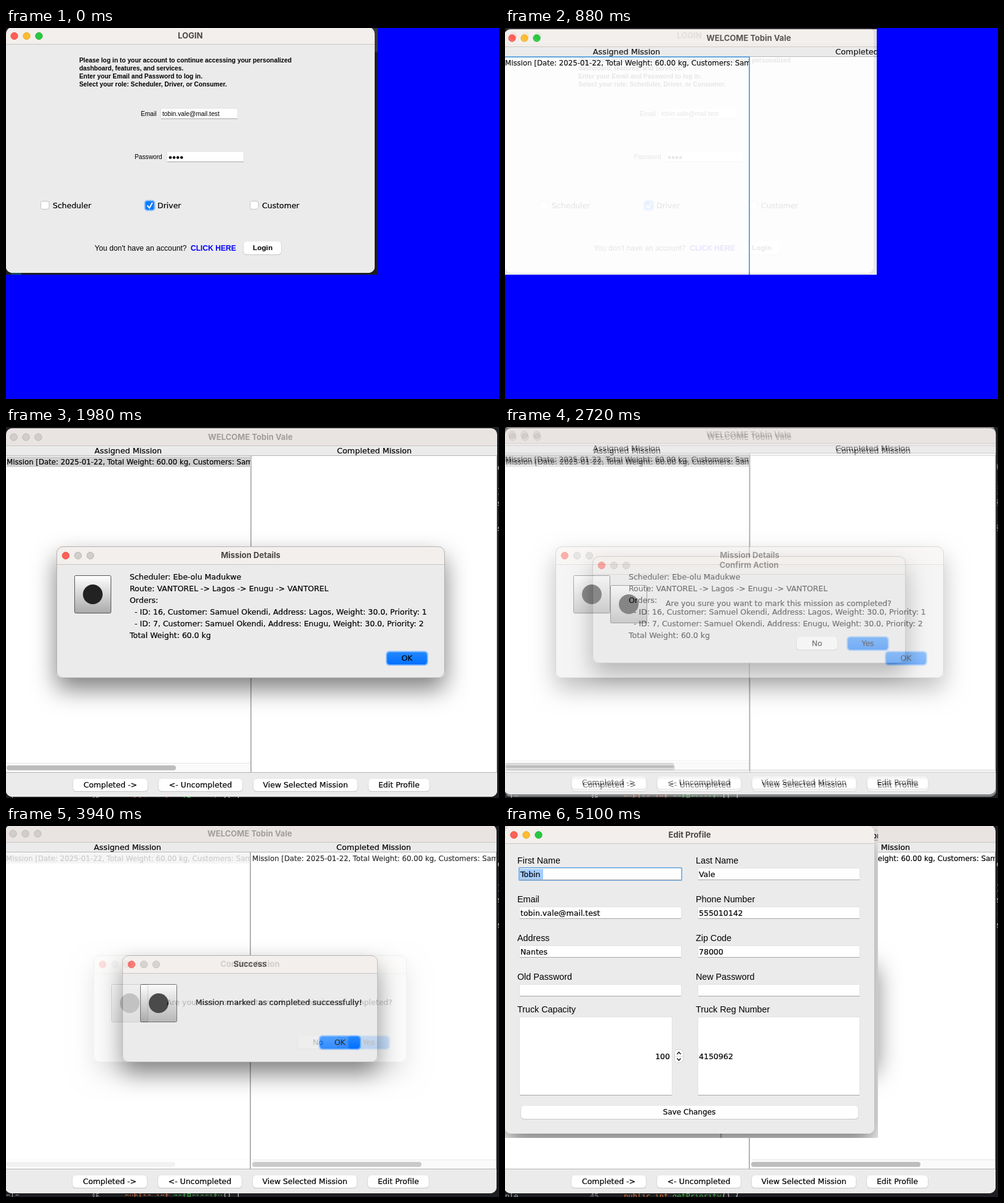
These frames come from a looping animation (801x603 px, 5500 ms). An HTML page:

```html
<!DOCTYPE html>
<html lang="en">
<head>
<meta charset="utf-8">
<title>Mission desk</title>
<style>
html, body { margin: 0; width: 100%; height: 100%; overflow: hidden; background: #00f; }
body > svg { position: absolute; left: 0; top: 0; }
text { font: 12.5px "DejaVu Sans", sans-serif; white-space: pre; }
text:not([class]) { stroke: #000; stroke-width: .2px; }
.arial { font-family: "Liberation Sans", Arial, sans-serif; }
.bold { font-weight: bold; }
.title { font: bold 13px Inter, sans-serif; }
.code { font: 12px "DejaVu Sans Mono", monospace; }
.shadow { filter: drop-shadow(0 18px 19px rgba(0, 0, 0, .5)); }
</style>
</head>
<body>
<script>
const W = 801, H = 603;
const PERSON = ['Tobin', 'Vale'], MAIL = 'tobin.vale@mail.test';
const SCHOOL = 'VANTOREL', CLIENT = 'Samuel Okendi';
const MISSION = `Mission [Date: 2025-01-22, Total Weight: 60.00 kg, Customers: ${CLIENT}]`;
const ACTIVE = '#f3efec', IDLE = '#e9e4e2', BODY = '#ebebeb';

const esc = s => s.replace(/&/g, '&amp;').replace(/</g, '&lt;').replace(/>/g, '&gt;');
const rect = (x, y, w, h, fill, more = '') =>
  `<rect x="${x}" y="${y}" width="${w}" height="${h}" fill="${fill}" ${more}/>`;
const dot = (x, y, r, fill, more = '') =>
  `<circle cx="${x}" cy="${y}" r="${r}" fill="${fill}" ${more}/>`;
const text = (x, y, s, size = 12.5, more = '') =>
  `<text x="${x}" y="${y}" style="font-size:${size}px" ${more}>${esc(s)}</text>`;
const middle = (x, y, s, size, more = '') => text(x, y, s, size, 'text-anchor="middle" ' + more);
const arial = (x, y, s, size, more = '') => text(x, y, s, size, 'class="arial" ' + more);
const bold = (x, y, s, size, fill = '#000') => text(x, y, s, size, `class="arial bold" fill="${fill}"`);

const clip = (x, y, w, h, inner) =>
  `<svg x="${x}" y="${y}" width="${w}" height="${h}" viewBox="${x} ${y} ${w} ${h}">${inner}</svg>`;

// Window frame: title bar of height bar, body below, traffic lights from lightX of which lit are coloured
function frame(x, y, w, h, bar, title, lightX, lit = 3, on = true, cx = x + w / 2) {
  const mid = y + bar / 2 + .5, body = h - bar - 10;
  const colors = ['#ff5f57', '#febc2e', '#28c840'], edges = ['#e2463f', '#e0a020', '#1aab29'];
  let s = rect(x, y, w, h, on ? ACTIVE : IDLE, 'rx="10"') +
    `<path d="M${x} ${y + bar}h${w}v${body}a10 10 0 0 1-10 10h${20 - w}a10 10 0 0 1-10-10z" fill="${BODY}"/>` +
    rect(x, y + bar, w, 1, '#c9c6c4');
  for (let i = 0; i < 3; i++) {
    s += dot(lightX + i * 20, mid, 5.7, i < lit ? colors[i] : '#d1cdcb',
      `stroke="${i < lit ? edges[i] : '#b3b0ae'}" stroke-width=".8"`);
  }
  return s + middle(cx, mid + 4, title, 13, `class="title" fill="${on ? '#494745' : '#a09d9b'}"`);
}

function button(x, y, w, label, h = 21) {
  return rect(x - .5, y, w + 1, h + 1, '#c6c6c6', 'rx="5.5"') + rect(x, y, w, h, '#fff', 'rx="5"') +
    middle(x + w / 2, y + Math.round(h / 2) + 4, label);
}
const blueButton = (x, y, w, label) => rect(x - 1, y - 1, w + 2, 24, '#86bcff', 'rx="6"') +
  rect(x + 1, y + 1, w - 2, 20, 'url(#blue)', 'rx="4.5"') + middle(x + w / 2, y + 15, label);

const field = (x, y, w, h) => rect(x - .5, y - .5, w + 1, h + 1, '#dadada') + rect(x, y, w, h, '#fff') + rect(x, y + h, w, 1, '#a6a6a6');

function checkbox(x, label, on) {
  const box = on
    ? rect(x - 1.5, 279.5, 18, 18, '#8fc0fb', 'rx="5"') + rect(x + .5, 281.5, 14, 14, '#0c7bff', 'rx="3"') +
      `<path d="M${x + 4} 289l3 3.5 4.5-8" fill="none" stroke="#fff" stroke-width="2" stroke-linecap="round"/>`
    : rect(x + .5, 281.5, 13.5, 13, '#fff', 'rx="3" stroke="#c2c2c2"');
  return box + text(x + 20, 293, label);
}

function login() {
  const lines = ['Please log in to your account to continue accessing your personalized',
    'dashboard, features, and services.', 'Enter your Email and Password to log in.',
    'Select your role: Scheduler, Driver, or Consumer.'];
  return rect(0, 0, 604, 401, '#1e1f22') + rect(590, 0, 14, 39, '#393a3d') + rect(8, 398, 17, 3, '#174d5c') +
    frame(0, -1, 599, 399, 27, 'LOGIN', 13.5) +
    lines.map((s, i) => bold(119, 56 + 13 * i, s, 10.3)).join('') +
    arial(219, 143, 'Email', 10.2) + field(252, 131, 124, 16) + arial(254, 143, MAIL, 10.3) +
    arial(209, 213, 'Password', 10.2) + field(262, 201, 124, 16) +
    [0, 1, 2, 3].map(i => dot(267 + 6.1 * i, 210.5, 2.3, '#000')).join('') +
    checkbox(56, 'Scheduler') + checkbox(226, 'Driver', true) + checkbox(396, 'Customer') +
    arial(144, 362, "You don't have an account?", 12.2) + bold(300, 362, 'CLICK HERE', 12.1, '#00f') +
    button(386, 347, 61, '') + bold(401, 361, 'Login', 11.8);
}

// Code editor peeking out behind the window
function editor(dy) {
  const y = 610 + dy;
  const code = (x, y, s, fill) => text(x, y, s, 12, `class="code" fill="${fill}"`);
  return rect(0, 0, W, H, '#1e1f22') +
    code(0, y, 'ple', '#9a9ca0') + code(138, y, '45', '#8a8c90') + code(193, y, 'public int', '#e0703a') +
    code(272, y, 'getPriority', '#3fa845') + code(352, y, '() {', '#ccc') +
    ['c', ')', 's', ':', 's'].map((c, i) => code(798, [70, 109, 128, 151, 169][i] + dy, c, '#ccc')).join('');
}

function desk(dx, dy, { on = false, selected = false, done = false } = {}) {
  const x = done ? 400 : 0;
  const row = (selected ? rect(0, 48, 397, 17, '#d0d0d0') : '') +
    clip(x, 47, 396, 18, text(x, 61, MISSION, 11.77));
  const bar = rect(x, 546, 396, 15, '#fafafa') + rect(x, 546, 396, 1, '#e6e6e6') +
    rect(x, 550, 275, 8, '#bdbdbd', 'rx="4"');
  return editor(dy) + `<g transform="translate(${dx} ${dy})">` +
    frame(-1, 2, 798, 599, 28, 'WELCOME ' + PERSON.join(' '), 11.5, on ? 3 : 0, on, 396) +
    middle(197.5, 43, 'Assigned Mission', 12.8) + middle(597.5, 43, 'Completed Mission', 12.8) +
    rect(-1, 46, 798, 516, '#b4b4b4') + rect(-1, 47, 397, 514, '#fff') + rect(398, 47, 398, 514, '#fff') +
    row + bar +
    (on ? rect(-1, 47, 398, 514.5, 'none', 'stroke="#559fdf" stroke-width="2"') : '') +
    button(108, 572, 121, 'Completed ->', 20) + button(247, 572, 136, '<- Uncompleted', 20) +
    button(401, 572, 169, 'View Selected Mission', 20) + button(588, 572, 99, 'Edit Profile', 20) + '</g>';
}

const dialog = (x, y, w, h, title) =>
  `<g class="shadow">${rect(x, y, w, h, BODY, 'rx="10"')}</g>` +
  frame(x, y, w, h, 29, title, x + 15, 1) +
  rect(x + .5, y + .5, w - 1, h - 1, 'none', 'rx="10" stroke="#b4b2b1"');

const icon = (x, y) => rect(x + .5, y + .5, 59, 61, 'url(#tile)', 'rx="2" stroke="#555"') + dot(x + 30, y + 31, 16, '#222');

function details() {
  const order = (id, city, n) => `- ID: ${id}, Customer: ${CLIENT}, Address: ${city}, Weight: 30.0, Priority: ${n}`;
  const lines = ['Scheduler: Ebe-olu Madukwe', `Route: ${SCHOOL} -> Lagos -> Enugu -> ${SCHOOL}`, 'Orders:',
    order(16, 'Lagos', 1), order(7, 'Enugu', 2), 'Total Weight: 60.0 kg'];
  return desk(1, 0, { selected: true }) + dialog(82, 194, 631, 214, 'Mission Details') + icon(111, 241) +
    lines.map((s, i) => text(s[0] === '-' ? 209 : 201, 248 + 19 * i, s)).join('') +
    blueButton(618, 365, 67, 'OK');
}

const confirmBox = () => desk(0, -4, { selected: true }) + dialog(142, 210, 509, 174, 'Confirm Action') +
  icon(171, 257) + text(261, 291, 'Are you sure you want to mark this mission as completed?') +
  button(474, 341, 66, 'No') + blueButton(556, 341, 67, 'Yes');

const success = () => desk(0, -4, { done: true }) + dialog(189, 210, 415, 174, 'Success') +
  icon(218, 257) + text(308, 291, 'Mission marked as completed successfully!') +
  blueButton(509, 341, 67, 'OK');

function profile() {
  const rows = [['First Name', PERSON[0], 'Last Name', PERSON[1]], ['Email', MAIL, 'Phone Number', '555010142'],
    ['Address', 'Nantes', 'Zip Code', '78000'], ['Old Password', '', 'New Password', '']];
  let s = desk(-46, -23) + `<g class="shadow">${rect(0, 0, 600, 500, BODY, 'rx="10"')}</g>` +
    frame(0, 0, 600, 500, 28, 'Edit Profile', 14.5) +
    rect(22, 67, 266, 22, '#68a9e6', 'rx="2"');
  rows.forEach(([a, b, c, d], i) => {
    const y = 61 + 63 * i;
    s += arial(20, y, a, 14.3) + arial(310, y, c, 14.3) + field(24, y + 8, 262, 18) + field(314, y + 8, 262, 18) +
      (i ? '' : rect(24, 70, 38, 17, '#a5cdff')) + text(25, y + 22, b) + text(315, y + 22, d);
  });
  return s + arial(20, 303, 'Truck Capacity', 14.3) + arial(310, 303, 'Truck Reg Number', 14.3) +
    field(24, 311, 247, 126) + field(314, 311, 262, 126) +
    text(268, 379, '100', 12.5, 'text-anchor="end"') + text(315, 379, '4150962') +
    rect(275.5, 363.5, 14, 21, '#fff', 'rx="5" stroke="#cfcfcf"') + rect(276, 374, 13, 1, '#ddd') +
    '<path d="M279.5 371l3-3.5 3 3.5M279.5 377.5l3 3.5 3-3.5" fill="none" stroke="#222" stroke-width="1.5"/>' +
    button(26, 455, 548, '') + middle(299.5, 469, 'Save Changes', 12);
}

// Width, height and content of each screen
const scenes = [
  [604, 401, login()], [797, 603, desk(0, 0, { on: true })], [801, 603, details()],
  [801, 601, confirmBox()], [801, 603, success()], [606, 507, profile()]
];
const gradient = (id, top, bottom) => `<linearGradient id="${id}" x2="0" y2="1">` +
  `<stop stop-color="${top}"/><stop offset="1" stop-color="${bottom}"/></linearGradient>`;
const defs = `<defs>${gradient('tile', '#fff', '#aaa')}${gradient('blue', '#2488ff', '#0070ff')}</defs>`;
document.body.innerHTML = scenes.map(([, , s], i) =>
  `<svg width="${W}" height="${H}">${i ? '' : defs}${s}</svg>`).join('');
const layers = [...document.querySelectorAll('body > svg')];

const crop = (el, w, h) => el.style.clipPath = `inset(0 ${W - w}px ${H - h}px 0)`;
crop(layers[0], 604, 401);

// Ten-step crossfades, each limited to the area both scenes share
function draw(now) {
  const t = now % 5500;
  for (let i = 1; i < layers.length; i++) {
    const step = Math.max(0, Math.min(10, Math.floor((t - 400 - 1040 * (i - 1)) / 60) + 1));
    const [w, h] = scenes[i], [pw, ph] = scenes[i - 1], full = step === 10;
    layers[i].style.visibility = step ? 'visible' : 'hidden';
    layers[i].style.opacity = step / 10;
    crop(layers[i], full ? w : Math.min(w, pw), full ? h : Math.min(h, ph));
  }
}
const start = performance.now();
function tick() {
  draw(performance.now() - start);
  requestAnimationFrame(tick);
}
tick();
</script>
</body>
</html>
```
